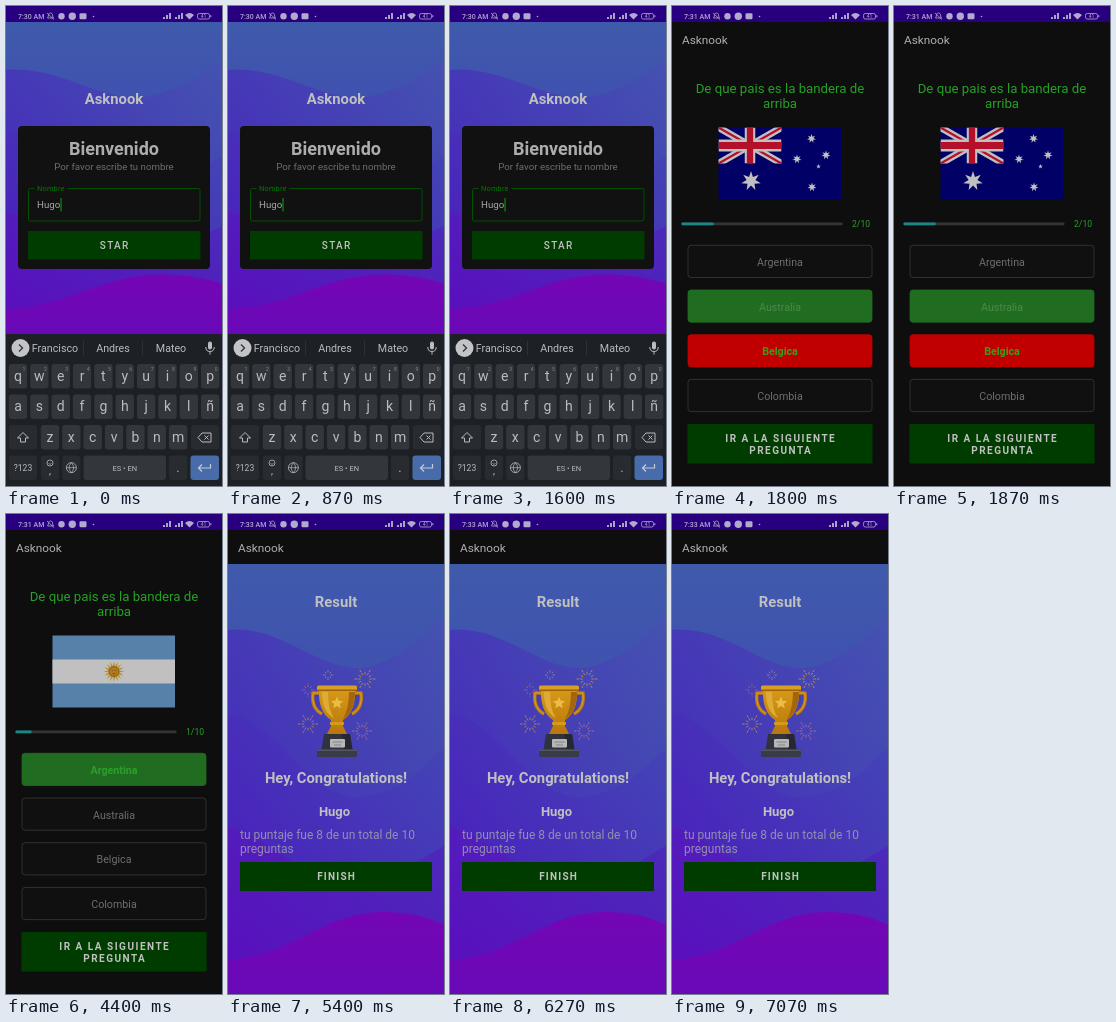
These frames come from a looping animation (216 by 480 pixels, 7.19 s). An HTML page:

```html
<!DOCTYPE html>
<html lang="es">
<head>
<meta charset="utf-8">
<title>Quiz</title>
<style>
  html, body { margin: 0; width: 100%; height: 100%; overflow: hidden; background: #0d0d0d; }
  svg { display: block; }
  #stage { width: 100%; height: 100%; font-family: Roboto, sans-serif; }
</style>
</head>
<body>
<svg id="stage" viewBox="0 0 216 480"></svg>
<script>
const APP = 'Asknook', PLAYER = 'Hugo';
const WHITE = '#c0c0c0', DARK = '#0e0e0e', BUTTON = '#003c00', GREEN = '#27a027', GRAY = '#6e6e6e';
const SCENES = [0, 1800, 3600, 5400], LOOP = 7190;

const rect = (x, y, w, h, fill, extra = '') =>
  `<rect x="${x}" y="${y}" width="${w}" height="${h}" fill="${fill}" ${extra}/>`;
const circle = (x, y, r, fill, extra = '') =>
  `<circle cx="${x}" cy="${y}" r="${r}" fill="${fill}" ${extra}/>`;
const path = (d, fill, extra = '') => `<path d="${d}" fill="${fill}" ${extra}/>`;
const line = (d, color, width = 1, extra = '') =>
  path(d, 'none', `stroke="${color}" stroke-width="${width}" ${extra}`);
const text = (s, x, y, size, fill, { weight = 400, anchor = 'middle', spacing = 0 } = {}) =>
  `<text x="${x + (anchor === 'middle' ? spacing / 2 : 0)}" y="${y}" font-size="${size}" fill="${fill}"
    font-weight="${weight}" text-anchor="${anchor}" letter-spacing="${spacing}">${s}</text>`;
const left = { anchor: 'start' }, bold = { weight: 700 };

function star(x, y, r, points, inner, fill) {
  const corners = Array.from({ length: points * 2 }, (_, i) => {
    const a = i * Math.PI / points - Math.PI / 2, d = i % 2 ? r * inner : r;
    return `${(x + d * Math.cos(a)).toFixed(2)} ${(y + d * Math.sin(a)).toFixed(2)}`;
  });
  return path(`M${corners.join('L')}Z`, fill);
}

function statusBar(time) {
  const signal = x => path(`M${x} 13h2v-2h-2zM${x + 3} 13h2v-4h-2zM${x + 6} 13h2v-6h-2z`, '#a9a3c6');
  const ink = '#b0aacb';
  return rect(0, 0, 216, 16, '#28007f') +
    text(time, 12, 13, 7, ink, { ...left, weight: 500 }) +
    path('M41.5 12c1-1 .8-3 1.2-4 .5-1.3 3.1-1.3 3.6 0 .4 1 .2 3 1.2 4z', 'none', `stroke="${ink}" stroke-width=".8"`) +
    line('M41 7l7 6.5', ink, .8) +
    circle(55.5, 10.3, 3.2, ink) + circle(66.3, 10.3, 3.7, ink) +
    rect(73.5, 7.3, 7, 6, ink, 'rx="1.2"') + circle(87.5, 10.5, .8, ink) +
    signal(157) + signal(169) +
    path('M179 9q4.5-4 9 0l-4.5 4.5z', ink) +
    rect(191.5, 7.5, 12, 5.5, 'none', `rx="1.8" stroke="${ink}" stroke-width=".8"`) +
    text('41', 197.5, 12.2, 5, ink) + rect(204.3, 9.2, 1, 2, ink);
}

// Layered waves, drawn 216 x 430 and squeezed to the free height
const waves = (top, height) => `<g transform="translate(0 ${top}) scale(1 ${height / 430})">` +
  rect(0, 0, 216, 430, 'url(#sky)') +
  path('M0 66C60 60 100 120 150 100S205 52 216 50V430H0Z', 'url(#wave1)') +
  path('M0 150C50 155 85 245 140 232S200 190 216 186V430H0Z', 'url(#wave2)') +
  path('M0 262C45 275 85 325 130 318S200 290 216 282V430H0Z', 'url(#wave3)') +
  path('M0 396C65 392 95 348 155 348C180 348 200 353 216 361V430H0Z', 'url(#wave4)') + '</g>';

const gradient = (id, from, to, diagonal) =>
  `<linearGradient id="${id}" x1="${diagonal ? 1 : 0}" y1="0" x2="0" y2="1">
    <stop stop-color="${from}"/><stop offset="1" stop-color="${to}"/></linearGradient>`;
const defs = '<defs>' +
  gradient('sky', '#3f5aab', '#4038bc') +
  gradient('wave1', '#4453b0', '#4720bd', true) +
  gradient('wave2', '#4347b5', '#4c16be', true) +
  gradient('wave3', '#4a2cba', '#5b0cbe', true) +
  gradient('wave4', '#7406b4', '#6809b8') +
  gradient('gold', '#d69a18', '#b8760c') + '</defs>';

function keyboard() {
  const ink = '#b9bcc1', key = '#33363b', special = '#282b30';
  const cap = (x, y, w, fill = key) => rect(x, y, w, 24.5, fill, 'rx="3"');
  const row = (letters, first, y) => [...letters].map((c, i) => {
    const x = first + i * 21.35;
    return cap(x - 9.2, y, 18.4) + text(c, x, y + 16.5, 14, ink);
  }).join('');
  const digits = [...'1234567890'].map((c, i) => text(c, 18 + i * 21.35, 365, 5, '#85888d')).join('');
  return rect(0, 328, 216, 152, '#1d2024') +
    circle(14.5, 342, 9, '#c3c4c6') + line('M13 338.5l3.5 3.5-3.5 3.5', '#34373c', 1.4) +
    text('Francisco', 49, 346, 10.7, ink) + text('Andres', 107, 346, 10.7, ink) + text('Mateo', 165, 346, 10.7, ink) +
    line('M77.5 335v14M136.5 335v14', '#34373c', .8) +
    rect(202, 335.5, 4, 8, ink, 'rx="2"') + line('M199.8 341q0 4.5 4.2 4.5t4.2-4.5M204 345.5v3', ink, 1) +
    row('qwertyuiop', 12, 358) + digits + row('asdfghjklñ', 12, 388.5) + row('zxcvbnm', 44, 419) +
    cap(3, 419, 28, special) + line('M17 426.5l-5.5 5.5h3v4h5v-4h3z', ink, 1) +
    cap(185, 419, 28, special) + line('M192 431.5l4-4.5h9v9h-9zM198.5 429.5l4 4m0-4l-4 4', ink, 1) +
    cap(3, 449.5, 28, special) + text('?123', 17, 464.5, 8.5, ink) +
    cap(34.8, 449.5, 18.4, special) + circle(44, 457, 3, 'none', `stroke="${ink}" stroke-width=".8"`) +
    line('M42.5 457.5q1.5 1.6 3 0', ink, .7) + text(',', 44, 468, 10, ink) +
    cap(56.2, 449.5, 18.4, special) + circle(65.4, 461.7, 5, 'none', `stroke="${ink}" stroke-width=".8"`) +
    line('M60.4 461.7h10M65.4 456.7q-4.5 5 0 10q4.5-5 0-10', ink, .7) +
    cap(77.5, 449.5, 82.5) + text('ES • EN', 118.8, 464.5, 7.5, ink) +
    cap(162.8, 449.5, 18.4, special) + text('.', 172, 465.5, 13, ink) +
    cap(184.5, 449.5, 28.5, '#486ca9') + line('M204.5 458v4h-12m3.5-3.5l-3.5 3.5 3.5 3.5', '#c3cad5', 1.2);
}

function welcome() {
  return waves(16, 312) + statusBar('7:30 AM') +
    text(APP, 108, 97.5, 14.8, WHITE, bold) +
    rect(12, 120, 192, 143, '#111', 'rx="4"') +
    text('Bienvenido', 108, 149, 18, '#adadad', bold) +
    text('Por favor escribe tu nombre', 108, 164, 9.7, GRAY) +
    rect(22.5, 182.5, 171.5, 32.5, 'none', 'rx="2" stroke="#005000"') +
    rect(28.5, 181, 33, 3, '#111') +
    text('Nombre', 31, 185.3, 7.4, '#007c00', { ...left, spacing: .2 }) +
    text(PLAYER, 31, 202.3, 9.7, '#a8a8a8', left) + rect(54.5, 192, 1.1, 13.5, '#00a000') +
    rect(22, 225, 172.5, 28.5, BUTTON) +
    text('STAR', 108, 243, 10, WHITE, { weight: 500, spacing: 1.3 }) +
    keyboard();
}

function australia() {
  const red = '#b4102a';
  const cross = 'M30 0v30M0 15h60', saltire = 'M0 0l60 30M60 0l-60 30';
  const stars = [[139.5, 132.5, 4.6], [125, 153, 4.6], [154, 149, 4.6], [140, 181, 4.6]];
  return rect(46.5, 121.5, 122.5, 72, '#000066') +
    `<svg x="46.5" y="121.5" width="63" height="36" viewBox="0 0 60 30" preserveAspectRatio="none">` +
    line(saltire, WHITE, 6) + line(saltire, red, 2) + line(cross, WHITE, 10) + line(cross, red, 6) + '</svg>' +
    star(79, 175, 10, 7, .45, WHITE) + star(146.5, 160.5, 2.4, 5, .42, WHITE) +
    stars.map(([x, y, r]) => star(x, y, r, 7, .45, WHITE)).join('');
}

function argentina() {
  return rect(46.5, 121.5, 122.5, 72, '#5781a9') + rect(46.5, 145.5, 122.5, 24, WHITE) +
    star(108, 157.5, 10.5, 16, .5, '#b98a2c') + circle(108, 157.5, 4.8, '#b47a1e', 'stroke="#73501c" stroke-width=".7"') +
    line('M105.7 156.5h1.5m1.6 0h1.5M106.5 159.7h3', '#68451a', .7);
}

// Marks map an option's name to its [fill, text colour, weight]
function question(flag, number, marks) {
  const options = ['Argentina', 'Australia', 'Belgica', 'Colombia'].map((name, i) => {
    const y = 239 + i * 44.7, mark = marks[name];
    const [fill, ink, weight] = mark || ['#101010', GRAY, 400];
    return rect(16, y + .3, 184, 32.2, fill, `rx="3" stroke="${mark ? fill : '#393939'}" stroke-width=".8"`) +
      text(name, 108, y + 20.8, 10.7, ink, { weight });
  }).join('');
  const heavy = { ...bold, spacing: 1.5 };
  return rect(0, 16, 216, 464, DARK) + statusBar('7:31 AM') +
    text(APP, 10, 38, 11.8, '#b0b0b0', left) +
    text('De que pais es la bandera de', 108, 86.5, 13.25, GREEN) + text('arriba', 108, 101.5, 13.25, GREEN) +
    flag + rect(9.5, 216.5, 161, 2.8, '#353535', 'rx="1"') + rect(9.5, 216.5, 16.1 * number, 2.8, '#168888', 'rx="1"') +
    text(`${number}/10`, 180, 221.3, 8.6, GREEN, left) + options +
    rect(15.5, 418, 185, 39.5, BUTTON) +
    text('IR A LA SIGUIENTE', 108, 436, 10, WHITE, heavy) + text('PREGUNTA', 108, 448, 10, WHITE, heavy);
}

function trophy() {
  const burst = (x, y, r, color, n = 12) => Array.from({ length: n }, (_, i) => {
    const a = i * 2 * Math.PI / n, c = Math.cos(a), s = Math.sin(a), far = i % 2 ? r * .75 : r;
    return line(`M${x + c * r * .4} ${y + s * r * .4}L${x + c * far} ${y + s * far}`, color, .8, 'stroke-dasharray="2.5 1"');
  }).join('');
  const handle = 'M91 179h-6q-2 15 9 21M127 179h6q2 15-9 21';
  return burst(137, 165, 11, '#c49a55') + burst(80, 176, 7, '#a4697e', 8) +
    burst(80, 210, 10, '#b7925e') + burst(134, 217, 10, '#b2788c') + burst(100, 161, 6, '#9c86a8', 8) +
    line(handle, '#b9790f', 3.4, 'stroke-linejoin="round"') + line(handle, '#daa42a', 1) +
    path('M91 175h36q1 23-12 31v6l4 8h-20l4-8v-6q-13-8-12-31z', 'url(#gold)') +
    path('M94 178h6q0 18 6 26-12-6-12-26z', '#deac36') + path('M121 178h6q0 20-12 27 6-10 6-27z', '#a5650c') +
    rect(89, 171.5, 40, 5.5, '#d99f20', 'rx="1.5"') + rect(89, 175.5, 40, 1.5, '#9c620d') +
    star(109, 189, 6.5, 5, .45, '#eabd48') + rect(102, 208, 14, 3, '#d69a1b', 'rx="1"') +
    path('M96 220h26l2.5 16h-31z', '#30323d') + path('M114 220h8l2.5 16h-8z', '#252732') +
    rect(102, 225, 15, 8.5, '#b7b7b9', 'rx="1"') + line('M104.5 228h10m-8.5 3h7', '#77777d', .8) +
    rect(89, 235.5, 40, 7.5, '#393b46', 'rx="1"') + rect(89, 235.5, 40, 1.5, '#545661');
}

function result() {
  const ink = '#9290ac';
  return waves(50, 430) + statusBar('7:33 AM') + rect(0, 16, 216, 34, DARK) +
    text(APP, 10, 38, 11.8, '#b0b0b0', left) +
    text('Result', 108, 93, 14.8, WHITE, bold) + trophy() +
    text('Hey, Congratulations!', 108, 268.5, 14.8, WHITE, bold) +
    text(PLAYER, 106.5, 302, 13, WHITE, bold) +
    text('tu puntaje fue 8 de un total de 10', 12, 324.5, 12, ink, left) +
    text('preguntas', 12, 338.5, 12, ink, left) +
    rect(12, 348, 192, 29, BUTTON) + text('FINISH', 108, 366.3, 10, WHITE, { ...bold, spacing: 1.2 });
}

const screens = [
  welcome(),
  question(australia(), 2, { Australia: ['#206c20', '#4e884e', 400], Belgica: ['#c00000', '#3d9a18', 700] }),
  question(argentina(), 1, { Argentina: ['#206c20', '#2ba02b', 700] }),
  result()
];
const stage = document.getElementById('stage');
stage.innerHTML = defs + screens.map(s => `<g class="screen">${s}</g>`).join('');
const groups = [...stage.querySelectorAll('.screen')];
const start = performance.now();

function draw() {
  const t = (performance.now() - start) % LOOP;
  const current = SCENES.findLastIndex(from => t >= from);
  groups.forEach((g, i) => g.style.display = i === current ? '' : 'none');
  requestAnimationFrame(draw);
}
draw();
</script>
</body>
</html>
```
